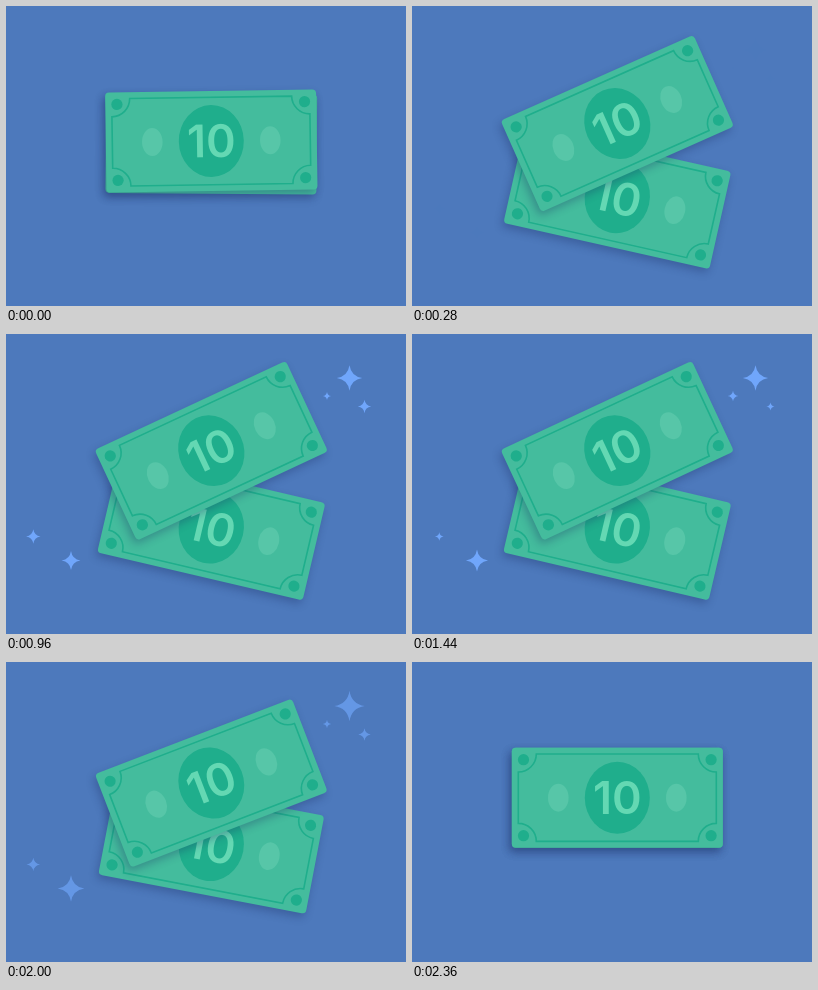
Recreate the animation shown at these times as an HTML page with a canvas. Size 400 by 300 pixels, loop 2.44 s.

```html
<!DOCTYPE html>
<html lang="en">
<head>
<meta charset="utf-8">
<title>Banknotes</title>
<style>
  html, body { margin: 0; width: 100%; height: 100%; overflow: hidden; background: #4d79bc; }
  canvas { display: block; width: 400px; height: 300px; }
</style>
</head>
<body>
<canvas id="stage" width="400" height="300"></canvas>
<script>
const ctx = document.getElementById('stage').getContext('2d');
const LOOP = 2440;
const COLOR = {
  sky: '#4d79bc', note: '#44bc9d', ink: '#1fae8c',
  oval: '#57c6a8', digits: '#64d8b3', spark: '#70a6fb'
};
const NOTE = { w: 211, h: 100, x: 205.3, y: 135.7 };

// Radius swings around `size` by `swing`, largest at time `peak`.
const SPARKS = [
  { x: 343.5, y: 44,    size: 13.3, swing: 2,   period: 800, peak: 400 },
  { x: 321,   y: 62,    size: 4.6,  swing: 0.7, period: 800, peak: 660 },
  { x: 358.5, y: 72.5,  size: 5.6,  swing: 1.5, period: 800, peak: 260 },
  { x: 65,    y: 226.5, size: 12.2, swing: 3,   period: 640, peak: 600 },
  { x: 27.3,  y: 202.5, size: 6,    swing: 1.7, period: 800, peak: 260 }
];

const ramp = (t, start, length) => Math.min(1, Math.max(0, (t - start) / length));
const ease = u => u * u * (3 - 2 * u);

// Rises from the start of the loop, then falls back over `closing` ms.
function spread(t, closing) {
  return t >= 2400 ? ease(ramp(t, 2400, 366))
    : ease(ramp(t, -40, 366)) - ease(ramp(t, 1880, closing));
}

function ellipse(x, y, rx, ry, color) {
  ctx.fillStyle = color;
  ctx.beginPath();
  ctx.ellipse(x, y, rx, ry, 0, 0, Math.PI * 2);
  ctx.fill();
}

function noteBorder() {
  const x = 99, y = 43.7, r = 18, q = Math.PI / 2;
  ctx.strokeStyle = COLOR.ink;
  ctx.lineWidth = 1.6;
  ctx.beginPath();
  ctx.arc(-x, -y, r, q, 0, true);
  ctx.arc(x, -y, r, 2 * q, q, true);
  ctx.arc(x, y, r, 3 * q, 2 * q, true);
  ctx.arc(-x, y, r, 0, -q, true);
  ctx.closePath();
  ctx.stroke();
}

function drawNote(dy, degrees) {
  ctx.save();
  ctx.translate(NOTE.x, NOTE.y + dy);
  ctx.rotate(degrees * Math.PI / 180);

  ctx.save();
  ctx.shadowColor = 'rgba(25, 45, 95, 0.32)';
  ctx.shadowBlur = 9;
  ctx.shadowOffsetX = -2;
  ctx.shadowOffsetY = 4;
  ctx.fillStyle = COLOR.note;
  ctx.beginPath();
  ctx.roundRect(-NOTE.w / 2, -NOTE.h / 2, NOTE.w, NOTE.h, 4);
  ctx.fill();
  ctx.restore();

  noteBorder();
  for (const side of [-1, 1]) {
    ellipse(side * 59, 0, 10.3, 14, COLOR.oval);
    ellipse(side * 93.8, -38, 5.6, 5.6, COLOR.ink);
    ellipse(side * 93.8, 38, 5.6, 5.6, COLOR.ink);
  }
  ellipse(0, 0, 32.5, 36, COLOR.ink);

  ctx.fillStyle = COLOR.digits;
  ctx.font = '600 45px Inter, sans-serif';
  ctx.textAlign = 'center';
  ctx.fillText('10', 0, 16.2);
  ctx.restore();
}

function drawSpark(spark, t) {
  const phase = 2 * Math.PI * (t - spark.peak) / spark.period;
  const r = spark.size + spark.swing * Math.cos(phase);
  const c = r * 0.13;
  ctx.save();
  ctx.translate(spark.x, spark.y);
  ctx.beginPath();
  ctx.moveTo(0, -r);
  ctx.quadraticCurveTo(c, -c, r, 0);
  ctx.quadraticCurveTo(c, c, 0, r);
  ctx.quadraticCurveTo(-c, c, -r, 0);
  ctx.quadraticCurveTo(-c, -c, 0, -r);
  ctx.closePath();
  ctx.fillStyle = COLOR.spark;
  ctx.fill();
  ctx.restore();
}

function draw(t) {
  ctx.fillStyle = COLOR.sky;
  ctx.fillRect(0, 0, 400, 300);

  ctx.globalAlpha = ramp(t, 280, 200) - ramp(t, 1920, 240);
  SPARKS.forEach(spark => drawSpark(spark, t));
  ctx.globalAlpha = 1;

  const lower = spread(t, 444);
  drawNote(58 * lower, 13.2 * lower);
  drawNote(-19 * spread(t, 390), -25 * spread(t, 480));
}

const start = performance.now();
function tick() {
  draw((performance.now() - start) % LOOP);
  requestAnimationFrame(tick);
}
tick();
</script>
</body>
</html>
```
